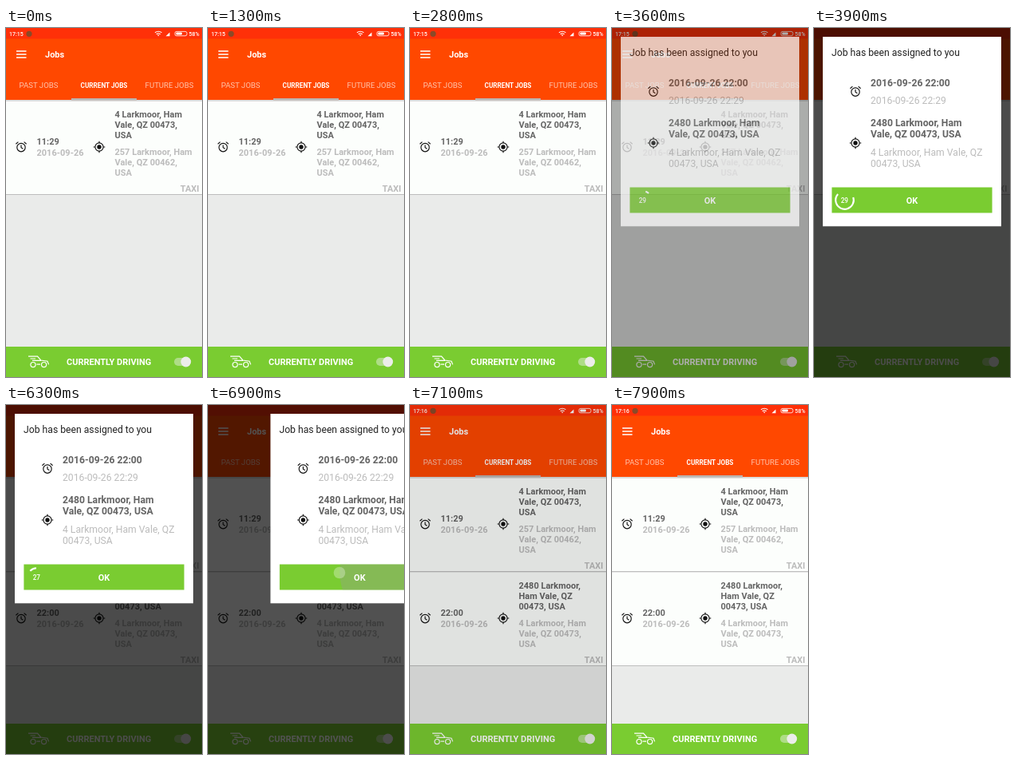
Recreate the animation shown at these times as an HTML page. Size 246x437 px, loop 8 s.

```html
<!DOCTYPE html>
<html lang="en">
<head>
<meta charset="utf-8">
<title>Jobs</title>
<style>
  html, body { margin: 0; width: 100%; height: 100%; overflow: hidden; }
  svg { display: block; width: 246px; height: 437px; font: 11px Roboto, sans-serif; }
  .bold { font-weight: 700; }
  .dark { fill: #646464; }
  .pale { fill: #bcbcbc; }
  .white { fill: #fff; }
  .mid { text-anchor: middle; }
  .end { text-anchor: end; }
  .line { fill: none; stroke: #fff; }
  .tab { font-size: 9.6px; fill: #fff; fill-opacity: .68; }
  .status { font-size: 7px; font-weight: 500; }
  .dialog { font-size: 12.2px; }
</style>
</head>
<body>
<svg viewBox="0 0 246 437">
  <defs>
    <g id="alarm" fill="none" stroke="#111" stroke-width="1.15">
      <circle cy=".6" r="5.2"/>
      <path d="M0-2.6V.8L2.4 2.3M-6.6-3.8l3-2.6M6.6-3.8l-3-2.6"/>
    </g>
    <g id="target" fill="none" stroke="#111" stroke-width="1.15">
      <circle r="5.1"/>
      <circle r="2.7" fill="#111" stroke="none"/>
      <path d="M0-7.3v2.2M0 7.3v-2.2M-7.3 0h2.2M7.3 0h-2.2"/>
    </g>
    <clipPath id="button"><rect x="22.4" y="199.4" width="201.2" height="32.2"/></clipPath>
  </defs>

  <rect width="246" height="437" fill="#eaebea"/>
  <g id="rows"></g>

  <rect width="246" height="90" fill="#ff4800"/>
  <rect width="246" height="13.5" fill="#ff3008"/>
  <rect y="90" width="246" height="2" fill="#ddd"/>
  <rect x="82" y="88" width="82" height="2.5" fill="#bab4af"/>
  <path class="line" stroke-width="1.6" d="M13 29h12.5M13 33h12.5M13 37h12.5"/>
  <text class="white bold" x="49" y="37">Jobs</text>
  <text class="tab mid" x="41" y="74.5">PAST JOBS</text>
  <text class="white bold mid" x="123" y="74.5" font-size="8.2">CURRENT JOBS</text>
  <text class="tab mid" x="205" y="74.5">FUTURE JOBS</text>

  <g id="status" class="status white">
    <text id="clock" x="4" y="9.5"></text>
    <circle cx="29" cy="7.3" r="3.6" fill="#8a4a28"/>
    <path class="line" stroke-width="1.1" d="M187 5.8q4.2-3.2 8.4 0M188.7 7.7q2.5-2 5 0"/>
    <path d="M189.8 8.6h2.8l-1.4 1.7zM200.5 10.2h5V5.4z"/>
    <rect class="line" x="212" y="4.4" width="15" height="5.4" rx="2" stroke-width=".8"/>
    <rect x="213.4" y="5.6" width="7.5" height="3" rx="1"/>
    <text x="229.5" y="9.5">58%</text>
  </g>

  <rect y="399" width="246" height="38" fill="#7acc31"/>
  <g class="line" stroke-width="1.2">
    <circle cx="34" cy="421.6" r="3.1"/>
    <circle cx="47.6" cy="421.6" r="3.1"/>
    <path d="M28 411.2h11.5l4.2 4.8 8.3 1.2 1.6 4.2M30.5 414h6.5M33 416.4h11M38.5 421.2h4.5"/>
  </g>
  <text class="white bold" x="76" y="422">CURRENTLY DRIVING</text>
  <rect x="211" y="413" width="20" height="10" rx="5" fill="#aedd86"/>
  <circle cx="225.8" cy="418" r="6.4" fill="#ecedea"/>

  <rect id="dim" width="246" height="437"/>

  <g id="dialog" class="dialog">
    <rect x="11" y="11" width="224" height="237.3" class="white"/>
    <text x="22" y="35" fill="#222">Job has been assigned to you</text>
    <use href="#alarm" x="52" y="79.5"/>
    <use href="#target" x="52" y="144"/>
    <text class="dark bold" x="71" y="73">2016-09-26 22:00</text>
    <text class="pale" x="71" y="95">2016-09-26 22:29</text>
    <text class="dark bold" x="71" y="122.5">2480 Larkmoor, Ham</text>
    <text class="dark bold" x="71" y="137">Vale, QZ 00473, USA</text>
    <text class="pale" x="71" y="159.5">4 Larkmoor, Ham Vale, QZ</text>
    <text class="pale" x="71" y="173.5">00473, USA</text>
    <g clip-path="url(#button)">
      <rect x="22" y="199" width="202" height="33" fill="#7acc31"/>
      <circle id="ripple" cx="165" cy="210" fill="#999" opacity=".35"/>
    </g>
    <text class="white bold mid" x="123" y="219.5" font-size="11">OK</text>
    <g id="countdown">
      <text id="seconds" class="white mid" x="38.3" y="218.6" font-size="8.2" font-weight="500"></text>
      <circle id="arc" class="line" cx="38.5" cy="215.5" r="11.3" stroke-width="2.1" pathLength="360"/>
    </g>
  </g>
  <circle id="touch" cx="165" cy="210" r="7.3" class="white" opacity=".3"/>
</svg>
<script>
const LOOP = 8000, STEP = 100, SPIN_START = 3490;
const $ = id => document.getElementById(id);

const lines = (cls, y, list) => list.map((s, i) =>
  `<text class="${cls} bold" x="136.5" y="${y + 13 * i}">${s}</text>`).join('');

const row = (id, y, time, from, to) => `<g id="${id}" transform="translate(0 ${y})">
  <rect width="246" height="117" fill="#fcfefc"/>
  <rect y="116" width="246" height="1" fill="#bdbdbd"/>
  <use href="#alarm" x="19" y="57"/><use href="#target" x="117" y="57"/>
  <text class="dark bold" x="38.5" y="54">${time}</text>
  <text class="pale bold" x="38.5" y="68">2016-09-26</text>
  ${lines('dark', 20, from)}${lines('pale', 66.5, to)}
  <text class="pale bold end" x="242.5" y="113">TAXI</text></g>`;

$('rows').innerHTML =
  row('first', 92, '11:29', ['4 Larkmoor, Ham', 'Vale, QZ 00473,', 'USA'],
    ['257 Larkmoor, Ham', 'Vale, QZ 00462,', 'USA']) +
  row('second', 210, '22:00', ['2480 Larkmoor,', 'Ham Vale, QZ', '00473, USA'],
    ['4 Larkmoor, Ham', 'Vale, QZ 00473,', 'USA']);

const clamp = x => Math.min(1, Math.max(0, x));
const smooth = x => x * x * (3 - 2 * x);

// Linear interpolation through [time, value] points
function track(t, points) {
  let [t0, v0] = points[0];
  for (const [t1, v1] of points) {
    if (t < t1) return t1 === t0 ? v0 : v0 + (v1 - v0) * clamp((t - t0) / (t1 - t0));
    [t0, v0] = [t1, v1];
  }
  return v0;
}

// cubic-bezier(.4, 0, .2, 1)
function fastOutSlowIn(x) {
  let lo = 0, hi = 1;
  for (let i = 0; i < 16; i++) {
    const s = (lo + hi) / 2, r = 1 - s;
    if (1.2 * r * r * s + .6 * r * s * s + s ** 3 < x) lo = s; else hi = s;
  }
  return smooth(lo);
}

// Material indeterminate ring: head grows, tail catches up, whole ring rotates
function spin(ms) {
  const p = ms % 1333 / 1333;
  const head = 270 * fastOutSlowIn(clamp(p * 2));
  const tail = 270 * fastOutSlowIn(clamp(p * 2 - 1));
  const turn = ms / 6665 * 720 + p * 90 + tail - 90;
  const sweep = Math.max(1, head - tail);
  $('arc').setAttribute('stroke-dasharray', `${sweep} ${360 - sweep}`);
  $('arc').setAttribute('transform', `rotate(${turn} 38.5 215.5)`);
}

const show = (id, on) => $(id).setAttribute('visibility', on ? 'inherit' : 'hidden');

function draw(t) {
  $('clock').textContent = t < 6000 ? '17:15' : '17:16';
  $('status').setAttribute('transform', `translate(0 ${track(t,
    [[3600, 0], [3900, -14], [6800, -14], [6900, -10.5], [7000, -2], [7100, 0]])})`);
  $('dim').setAttribute('opacity', track(t,
    [[3200, 0], [3600, .32], [3900, .7], [6800, .7], [6900, .68], [7000, .36], [7100, .11], [7400, 0]]));

  show('second', t >= 4500);
  show('dialog', t >= 3400 && t < 7100);
  $('dialog').setAttribute('opacity', track(t, [[3400, 0], [3600, .72], [3800, 1]]));
  $('dialog').setAttribute('transform', `translate(${260 * smooth(clamp((t - 6800) / 300))} 0)`);
  $('ripple').setAttribute('r', track(t, [[6700, 0], [6900, 67], [7000, 130]]));

  show('countdown', t < 6800);
  const elapsed = Math.max(0, (t > 4000 && t < 4300 ? 4000 : t) - SPIN_START);
  $('seconds').textContent = 29 - Math.floor(elapsed / 1000);
  spin(elapsed);
  show('touch', t >= 6700 && t < 7000);
}

const start = performance.now();
function tick() {
  const t = (performance.now() - start) % LOOP;
  draw(Math.floor(t / STEP) * STEP);
  requestAnimationFrame(tick);
}
tick();
</script>
</body>
</html>
```
